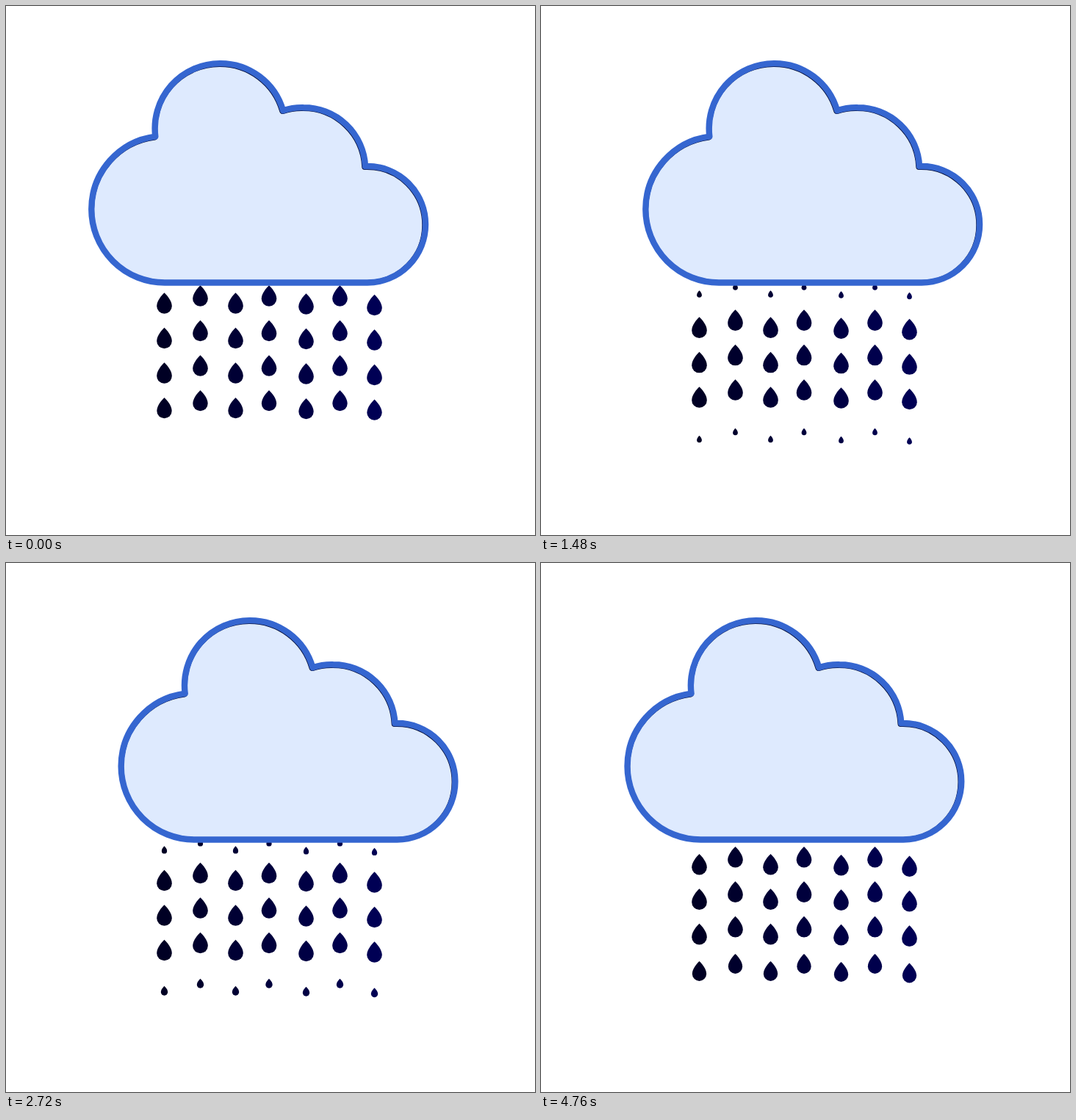
Animation of 720x720 px, one loop 4800 ms. Source, as an HTML page:

```html
<!DOCTYPE html>
<html lang="en">
<head>
<meta charset="utf-8">
<title>Rain cloud</title>
<style>
  html, body { margin: 0; width: 100%; height: 100%; overflow: hidden; background: #fff; }
  svg { display: block; width: 100%; height: 100%; }
</style>
</head>
<body>
<svg viewBox="0 0 720 720">
  <defs>
    <path id="drop" d="M0-28.4C3.5-25 10.3-17.5 10.3-10A10.3 10.2 0 0 1-10.3-10C-10.3-17.5-3.5-25 0-28.4Z"/>
    <path id="shape" d="M216 376.5A99.7 100 0 0 1 116.3 276.5A99.7 100 0 0 1 203.3 177.6
      A88.6 88.6 0 0 1 291 78.1A88.6 88.6 0 0 1 377 142.2
      A84 84 0 0 1 405 138.2A84 84 0 0 1 489 218
      L492 218A79 79.2 0 0 1 571 297.2A79 79.2 0 0 1 492 376.5Z"/>
    <clipPath id="inside"><use href="#shape"/></clipPath>
  </defs>
  <g id="rain"></g>
  <g id="cloud" stroke-width="8.4" stroke-linejoin="round">
    <use href="#shape" fill="#deeafe"/>
    <g clip-path="url(#inside)">
      <use href="#shape" fill="none" stroke="#0a1440" transform="translate(-.6 .7)"/>
    </g>
    <use href="#shape" fill="none" stroke="#3566d0"/>
  </g>
</svg>
<script>
const LOOP = 4800, STEP = 40;
const COLS = [[215.5, 0], [264.5, -10], [312.5, 0], [358, -10], [408.5, 1], [454.5, -10], [501.5, 2.5]];
const BURSTS = [-23.75, 7.9, 39.8, 71, 102];   // start of each shower, in steps
const ROWS = 4, ROW_GAP = 7.67, SPEED = 6.19;
const HIDDEN = 350, TOP = 398.5, END = 593, FALL = 195.5, HALF = 14;

const rain = document.getElementById('rain');
const cloud = document.getElementById('cloud');

function make(tag, attrs, parent) {
  const el = document.createElementNS('http://www.w3.org/2000/svg', tag);
  for (const key in attrs) el.setAttribute(key, attrs[key]);
  return parent.appendChild(el);
}

// A row holds one drop per column.
const rows = [];
for (const burst of BURSTS) {
  for (let r = 0; r < ROWS; r++) {
    const g = make('g', {}, rain);
    rows.push({
      g,
      start: burst + ROW_GAP * r,
      drops: COLS.map((c, n) => make('use', { href: '#drop', fill: `rgb(0,0,${36 + n * 8})` }, g))
    });
  }
}

// Drops shrink at the end of each fall: once under the cloud, once at the bottom.
function sizeAt(y) {
  const q = Math.max(0, ((y < TOP ? y + FALL : y) - 540) / 44);
  return Math.max(0.33, 1 - q ** 2.5);
}

function draw(ms) {
  const step = Math.floor(ms % LOOP / STEP);
  const shift = 20.5 * (1 - Math.cos(2 * Math.PI * step / 126));
  cloud.setAttribute('transform', `translate(${shift} 0)`);

  for (const row of rows) {
    const y = 400 + SPEED * (step - row.start);
    const shown = y > HIDDEN && y < END;
    row.g.setAttribute('display', shown ? 'inline' : 'none');
    if (!shown) continue;
    const s = sizeAt(y);
    row.drops.forEach((d, n) => {
      const [x, dy] = COLS[n];
      d.setAttribute('transform', `translate(${x} ${y + HALF + dy}) scale(${s})`);
    });
  }
}

const begin = performance.now();
function tick() {
  draw(performance.now() - begin);
  requestAnimationFrame(tick);
}
tick();
</script>
</body>
</html>
```
